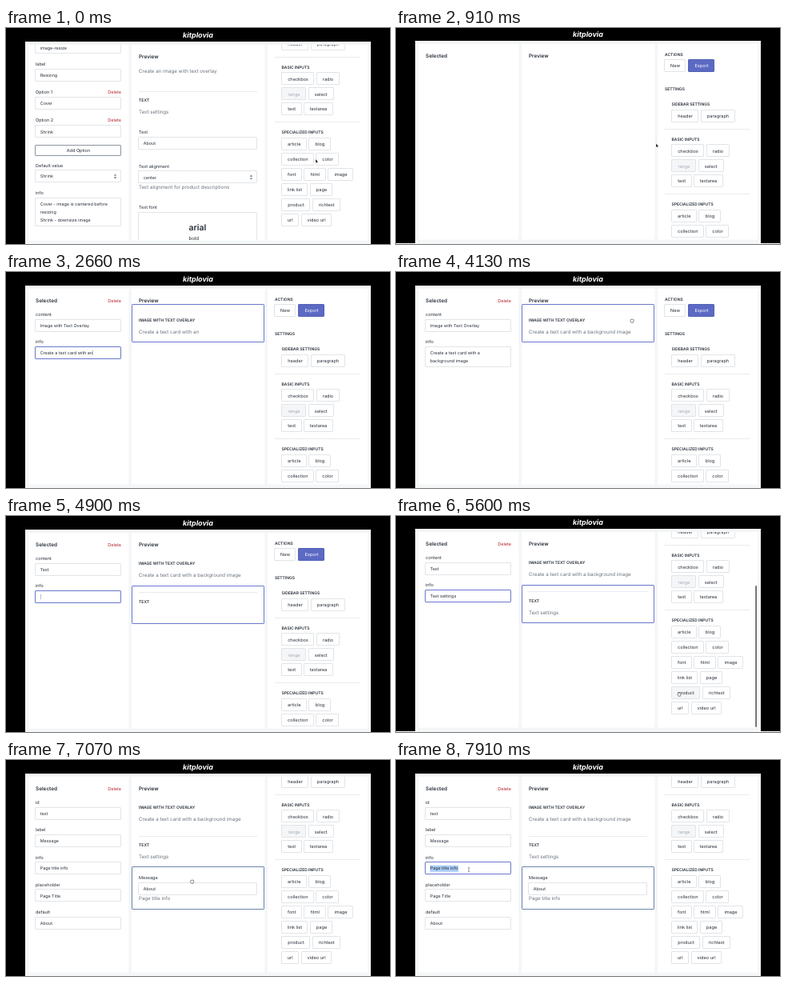
Write an HTML page that moves like this. It is 480 px wide and 270 px high and loops after 8 s.

```html
<!DOCTYPE html>
<html lang="en">
<head>
<meta charset="utf-8">
<title>Settings builder</title>
<style>
  html, body { margin: 0; width: 100%; height: 100%; overflow: hidden; background: #000; }
  svg { display: block; width: 480px; height: 270px; }
  text { font-family: Inter, Roboto, "Open Sans", sans-serif; text-rendering: geometricPrecision; white-space: pre; }
</style>
</head>
<body>
<svg id="stage" viewBox="0 0 480 270" xmlns="http://www.w3.org/2000/svg"></svg>
<script>
const LOOP = 8000, STEP = 70;
const INK = '#252d38', MUTED = '#69727c', LINE = '#e1e4e8', BLUE = '#6b78cc', RED = '#b5202b';

// Moments of the story, in ms
const RESET = 560, DROP1 = 1470, DROP2 = 4620, DROP3 = 6930;
const DRAGS = [
  [1330, DROP1, 'header', 33],
  [4410, DROP2, 'header', 33],
  [6650, DROP3, 'text', 24]
];

// time, x, y, cursor kind (empty = hidden while typing)
const MOUSE = [
  [0, 387, 164, 'arrow'], [559, 387, 164, 'arrow'],
  [560, 303, 168, 'arrow'], [910, 325, 145.5, 'arrow'], [1260, 362, 111, 'arrow'],
  [1330, 362, 111, 'hand'], [1470, 240, 62, 'hand'], [1540, 80, 67, ''],
  [3360, 110, 104, 'arrow'], [3570, 270, 75, 'hand'], [3710, 295, 61, 'hand'],
  [4130, 295, 61, 'hand'], [4340, 362, 112, 'hand'], [4410, 362, 112, 'hand'],
  [4620, 240, 110, 'hand'], [4690, 80, 67, ''],
  [5250, 200, 130, 'arrow'], [5460, 352, 214, 'hand'], [5600, 354, 224, 'hand'],
  [5810, 354, 224, 'arrow'], [6230, 365, 236.5, 'arrow'], [6580, 357, 109, 'hand'],
  [6650, 357, 109, 'hand'], [6930, 240, 158, 'hand'], [7140, 230, 150, 'arrow'],
  [7490, 95, 136, 'beam'], [7630, 43, 136, 'beam'], [7840, 91, 137, 'beam'], [8000, 91, 137, 'beam']
];

const SCROLL = [
  [0, 91], [559, 91], [560, 0], [5250, 0], [5530, 90],
  [5740, 90], [5950, 84], [8000, 84]
];

// Rows of buttons: y, then label, x, width
const BUTTONS = [
  [104, ['header', 345, 33], ['paragraph', 381.5, 42]],
  [147.3, ['checkbox', 345, 40], ['radio', 388.5, 28]],
  [166.2, ['range', 345, 30], ['select', 378.5, 30.5]],
  [185, ['text', 345, 24.5], ['textarea', 372.5, 36]],
  [229, ['article', 345, 30.5], ['blog', 379, 27]],
  [247.9, ['collection', 345, 39.5], ['color', 388, 28]],
  [266.8, ['font', 345, 24.5], ['html', 373, 26.5], ['image', 403, 31]],
  [285.7, ['link list', 345, 32], ['page', 381, 27]],
  [304.6, ['product', 345, 35], ['richtext', 384, 33.5]],
  [323.5, ['url', 345, 20.5], ['video url', 369.5, 37]]
];

const clamp = v => Math.min(1, Math.max(0, v));

function span(table, t) {
  let i = 0;
  while (i < table.length - 2 && t >= table[i + 1][0]) i++;
  const a = table[i], b = table[i + 1];
  const k = clamp((t - a[0]) / (b[0] - a[0]));
  return { a, b, k: k * k * (3 - 2 * k) };
}
const mix = (s, i) => s.a[i] + (s.b[i] - s.a[i]) * s.k;
const typed = (s, t, from, to) => s.slice(0, Math.round(s.length * clamp((t - from) / (to - from))));

// y is the middle of the capitals
function text(s, x, y, size, fill = INK, more = '') {
  return `<text x="${x}" y="${y + size * .36}" font-size="${size}" fill="${fill}" ${more}>${s}</text>`;
}
const bold = (s, x, y, size) => text(s, x, y, size, INK, 'font-weight="600"');
const right = (s, x, y) => text(s, x, y, 5.5, RED, 'text-anchor="end"');
const rect = (x, y, w, h, fill, more = '') =>
  `<rect x="${x}" y="${y}" width="${w}" height="${h}" fill="${fill}" ${more}/>`;

// Borders sit on whole pixels
const snap = v => Math.round(v) - .5;
const box = (x, y, w, h, line = LINE, fill = '#fff') =>
  rect(snap(x), snap(y), Math.round(w), Math.round(h), fill, `stroke="${line}" rx=".6"`);
const rule = (x1, x2, y) => rect(x1, Math.floor(y), x2 - x1, 1, '#e8ebee');
const group = (s, attr) => `<g ${attr}>${s}</g>`;

function button(label, x, y, w, state = '') {
  const off = state === 'off', hot = state === 'hot';
  return box(x, y, w, 14.6, LINE, off || hot ? '#f4f6f8' : '#fff') +
    text(label, x + w / 2, y + 7.4, 5.6, off ? '#a3adb7' : INK, 'text-anchor="middle"');
}

function input(value, x, y, w, o = {}) {
  const lines = Array.isArray(value) ? value : [value];
  let s = box(x, y, w, 14.8 + (lines.length - 1) * 10.2, o.focus ? BLUE : LINE);
  if (o.marked) s += rect(x + 5.5, y + 3.6, 35.5 * o.marked, 8, '#a9cdf5');
  lines.forEach((line, i) => {
    const caret = o.caret && i === lines.length - 1 ? '<tspan font-weight="300">|</tspan>' : '';
    s += text(line + caret, x + 5.7, y + 7.4 + i * 10.2, 5.4);
  });
  if (o.select) {
    const ax = x + w - 7.5, ay = y + 7.4;
    s += `<path d="M${ax - 1.7} ${ay - .8}l1.7 -2.2 1.7 2.2zM${ax - 1.7} ${ay + .8}l1.7 2.2 1.7 -2.2z" fill="#637381"/>`;
  }
  return s;
}

const label = (s, y, x = 37) => text(s, x, y, 5.5);

function field(i, name, value, o) {
  const y = 53.3 + i * 34.2;
  return label(name, y) + input(value, 37, y + 6.4, 107, o);
}

function finishedForm() {
  return input('image-resize', 37, 17.2, 107) +
    label('label', 45) + input('Resizing', 37, 51.6, 107) +
    label('Option 1', 80) + right('Delete', 144, 80) + input('Cover', 37, 87, 107) +
    label('Option 2', 115.5) + right('Delete', 144, 115.5) + input('Shrink', 37, 122.3, 107) +
    box(37, 146.6, 107, 12.6, '#8b949e') +
    text('Add Option', 90.5, 153, 5.5, INK, 'text-anchor="middle"') +
    label('Default value', 172) + input('Shrink', 37, 178, 107, { select: true }) +
    label('info', 206) +
    input(['Cover - image is centered before', 'resizing', 'Shrink - downsize image'], 37, 212.6, 107);
}

function finishedPreview() {
  return bold('Preview', 166, 35.5, 6.4) +
    text('Create an image with text overlay', 166, 54, 6.2, MUTED) + rule(166, 314, 79) +
    bold('TEXT', 166, 90, 5.05) + text('Text settings', 166, 104.5, 6.2, MUTED) +
    label('Text', 130, 166) + input('About', 166, 136.5, 148) +
    label('Text alignment', 173, 166) + input('center', 166, 179.2, 148, { select: true }) +
    text('Text alignment for product descriptions', 166, 199, 6.1, MUTED) +
    label('Text font', 224.3, 166) + box(166, 231, 148, 50) +
    bold('arial', 228.5, 249, 10.5) + text('bold', 228.5, 263, 6.1);
}

// Texts of the two headers while they are typed
function words(t) {
  const full = 'Create a text card with a background image';
  let info = typed('Create a text card with an', t, 2030, 2660);
  if (t >= 2730) info = full.slice(0, 25) + typed(full.slice(25), t, 2730, 3220);
  return {
    head1: typed('Image with Text Overlay', t, 1540, 1960), info1: info,
    head2: typed('Text', t, 4690, 4830), info2: typed('Text settings', t, 4900, 5180)
  };
}

function form(t, w) {
  let s = bold('Selected', 37, 35.3, 6.4);
  if (t < DROP1) return s;
  s += right('Delete', 144, 35.8);
  const blink = Math.floor(t / 500) % 2 === 0;
  if (t < DROP2) {
    const onHead = t >= 1540 && t < 2030, onInfo = t >= 2030 && t < 3360;
    const info = w.info1.length > 35 ? [w.info1.slice(0, 25), w.info1.slice(26)] : w.info1;
    return s + field(0, 'content', w.head1, { focus: onHead, caret: onHead }) +
      field(1, 'info', info, { focus: onInfo, caret: onInfo });
  }
  if (t < DROP3) {
    const onHead = t >= 4690 && t < 4900, onInfo = t >= 4900;
    return s + field(0, 'content', w.head2, { focus: onHead, caret: onHead }) +
      field(1, 'info', w.info2, { focus: onInfo, caret: onInfo && (t < 5250 || blink) });
  }
  return s + field(0, 'id', 'text') + field(1, 'label', 'Message') +
    field(2, 'info', 'Page title info', { focus: t >= 7560, marked: clamp((t - 7630) / 210) }) +
    field(3, 'placeholder', 'Page Title') + field(4, 'default', 'About');
}

function header(i, title, info, on, ruled) {
  const y = 40.5 + 47 * i, up = on ? 0 : -.5;
  return (on ? box(157.5, y, 165, 47, BLUE) : '') +
    (ruled ? rule(166, 314, y + 8) : '') +
    bold(title.toUpperCase(), 166, y + 19.4 + up, 5.05) +
    text(info, 166, y + 34 + up, 6.2, MUTED);
}

function preview(t, w) {
  let s = bold('Preview', 166, 35.3, 6.4);
  if (t >= DROP1) s += header(0, w.head1, w.info1, t < DROP2, false);
  if (t >= DROP2) s += header(1, w.head2, w.info2, t < DROP3, t < 5810 || t >= 6650);
  if (t >= DROP3) {
    s += box(157.5, 133.5, 165, 53, '#6b84a8') + label('Message', 147, 166) +
      input('About', 166, 153.6, 148) + text('Page title info', 166, 173, 6.1, MUTED);
  }
  return s;
}

function palette(t) {
  let s = bold('ACTIONS', 336, 34, 5) + button('New', 336, 41, 26) +
    box(366.2, 41, 31.6, 14.6, '#5260b5', '#5c6ac4') +
    text('Export', 382, 48.4, 5.6, '#fff', 'text-anchor="middle"') +
    bold('SETTINGS', 336, 77, 5) + bold('SIDEBAR SETTINGS', 344.5, 96.4, 5) +
    rule(336, 442, 127) + bold('BASIC INPUTS', 344.5, 140, 5) +
    rule(336, 442, 208) + bold('SPECIALIZED INPUTS', 344.5, 221.5, 5);
  for (const [y, ...row] of BUTTONS)
    for (const [name, x, w] of row) {
      const hot = name === 'product' && t >= 5460 && t < 5950;
      s += button(name, x, y, w, name === 'range' ? 'off' : hot ? 'hot' : '');
    }
  return s;
}

function cursor(kind, x, y) {
  const shapes = {
    arrow: '<path d="M0 0V5L1.2 4 2 5.6 2.8 5.2 2.1 3.7 3.6 3.6Z" fill="#111" stroke="#fff" stroke-width=".3"/>',
    hand: '<path d="M-2 -.6Q-2.4 -2 -1 -2L1.6 -2.2Q2.6 -2 2.3 .2L1.6 2.4H-1L-2.2 .8Z" fill="#fff" stroke="#555" stroke-width=".8"/>',
    beam: '<path d="M-1 -2.7H1M0 -2.7V2.7M-1 2.7H1" fill="none" stroke="#444" stroke-width=".6"/>'
  };
  return kind ? group(shapes[kind], `transform="translate(${x} ${y}) scale(.9)"`) : '';
}

function scene(t) {
  const w = words(t), first = t < RESET;
  const scroll = Math.round(mix(span(SCROLL, t), 1));
  const lifted = t >= RESET && t < 1260 || t >= 4970 && t < 5810;
  const m = span(MOUSE, t), mx = mix(m, 1), my = mix(m, 2);
  const clips = [[28, 125.4], [157, 166.4], [327, 125.4]];

  let s = '<defs>' + clips.map(([x, wd], i) =>
    `<clipPath id="p${i}">${rect(x, 21, wd, 244.6, '#000')}</clipPath>`).join('') + '</defs>';
  s += rect(0, 0, 480, 270, '#000') + rect(24, 17, 432, 253, '#f4f6f8');
  s += text('kitplovia', 240, 9, 9, '#fff', 'font-weight="700" font-style="italic" text-anchor="middle"');

  const bodies = [
    first ? finishedForm() : form(t, w),
    first ? finishedPreview() : preview(t, w),
    group(palette(t), `transform="translate(0 ${-scroll})"`)
  ];
  clips.forEach(([x, wd], i) => {
    s += rect(x, 21, wd, 244.6, '#fff') + group(bodies[i], `clip-path="url(#p${i})"`);
  });
  if (t >= 5250 && t < 6440) s += rect(449.2, 88 - (90 - scroll) * .75, 1.8, 177, '#62676c', 'rx=".9"');

  for (const [from, to, name, width] of DRAGS)
    if (t >= from && t < to) s += group(button(name, mx - width / 2, my - 7.3, width), 'opacity=".8"');
  s += cursor(m.a[3], mx, my);
  return rect(0, 0, 480, 270, '#f4f6f8') + group(s, `transform="translate(0 ${lifted ? -1 : 0})"`);
}

const stage = document.getElementById('stage');
let shown = -1;
function tick(now) {
  const step = Math.floor((now % LOOP) / STEP);
  if (step !== shown) {
    shown = step;
    stage.innerHTML = scene(Math.min(step, 113) * STEP);
  }
  requestAnimationFrame(tick);
}
tick(0);
</script>
</body>
</html>
```
